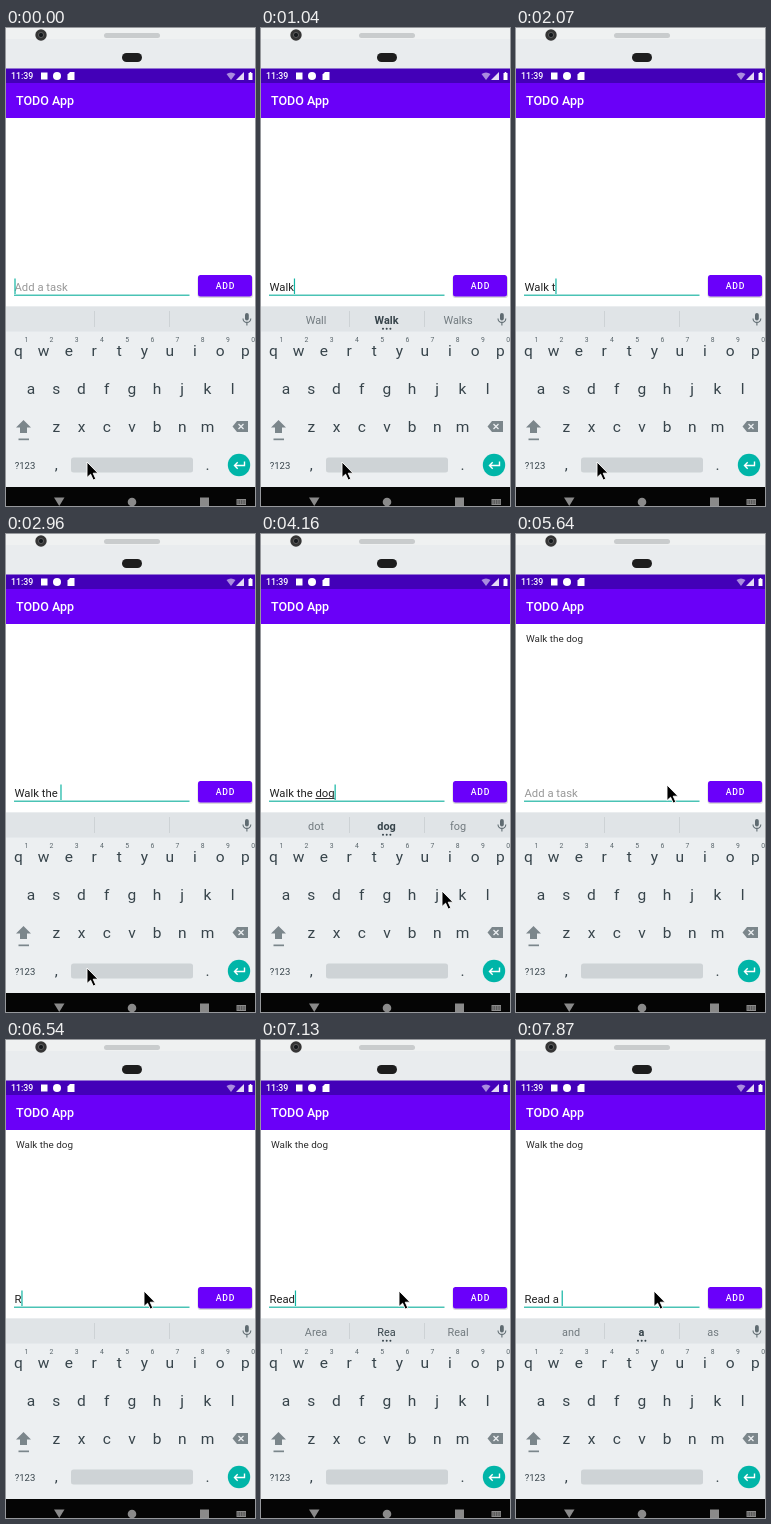
These frames come from a looping animation (249x478 px, 8 s). An HTML page:

```html
<!DOCTYPE html>
<html lang="en">
<head>
<meta charset="utf-8">
<title>TODO App</title>
<style>
  html, body { margin: 0; height: 100%; overflow: hidden; background: #fff; }
  svg { display: block; width: 249px; height: 478px; }
  text { font-family: Roboto, sans-serif; white-space: pre; }
  .mid { text-anchor: middle; }
  .medium { font-weight: 500; }
  .entry { font-size: 11.3px; }
  .word { font-size: 10.9px; fill: #717a7f; }
  #keys { fill: #37444b; font-size: 15.5px; }
  #keys .digit { font-size: 6.8px; fill: #59656b; }
</style>
</head>
<body>
<svg viewBox="0 0 249 478">
  <!-- device -->
  <rect width="249" height="41" fill="#e9ecee"/>
  <rect width="249" height="11" fill="#eff1f1"/>
  <circle cx="35" cy="7" r="5.7" fill="#353535"/>
  <circle cx="35" cy="7" r="2.6" fill="#15191c" stroke="#666" stroke-width=".8"/>
  <rect x="98" y="5" width="56" height="5" rx="2.5" fill="#c9cccd"/>
  <rect x="116" y="25" width="20" height="9" rx="4.5" fill="#1d1d1d"/>

  <!-- status and title bars -->
  <rect y="40.5" width="249" height="15" fill="#4300b8"/>
  <g fill="#fff">
    <text x="5" y="51.3" font-size="8.8" class="medium">11:39</text>
    <rect x="35" y="44.5" width="6.5" height="7"/>
    <circle cx="51" cy="48" r="4"/>
    <path d="M64 44h4.500v8h-7v-5.500z"/>
    <path d="M220.500 46q4.500-3 9 0l-4.500 6z" opacity=".55"/>
    <path d="M238 44v8h-8z" opacity=".85"/>
    <path d="M242.500 45h1.200v-1h1.600v1h1.200v7h-4z"/>
  </g>
  <rect y="55" width="249" height="35" fill="#6a00f8"/>
  <text x="10" y="77" font-size="12.5" class="medium" fill="#fff">TODO App</text>

  <!-- content -->
  <text id="item" x="10" y="108" font-size="9.9" fill="#2c2c2c">Walk the dog</text>
  <text id="hint" x="8.5" y="262.5" class="entry" fill="#989898">Add a task</text>
  <text id="entry" x="8.5" y="262.5" class="entry" fill="#222" xml:space="preserve"></text>
  <rect id="composing" y="264" height="1" fill="#333"/>
  <rect x="8" y="266.600" width="175.500" height="1.2" fill="#1fb5a3"/>
  <rect id="caret" y="250.500" width="1.2" height="15.500" fill="#12b5a3"/>
  <rect id="shadow" x="191.500" y="248" width="55.500" height="22" rx="3" fill="#000" opacity=".15"/>
  <rect id="button" x="192" y="247" width="54" height="21.500" rx="2.5"/>
  <text x="219.400" y="261" class="mid medium" font-size="8.7" letter-spacing=".8" fill="#fff">ADD</text>

  <!-- keyboard -->
  <rect y="278.500" width="249" height="181" fill="#eceff1"/>
  <rect y="278.500" width="249" height="25" fill="#e0e4e7"/>
  <path d="M88.500 283v16M163.500 283v16" stroke="#cdd2d5"/>
  <g id="words">
    <text class="word mid" x="55" y="295.500"></text>
    <text class="word mid" x="125.500" y="295.500" style="fill:#37444b"></text>
    <text class="word mid" x="197" y="295.500"></text>
    <path d="M122 300.800h0m3.700 0h0m3.700 0h0" stroke="#37444b" stroke-width="2" stroke-linecap="round"/>
  </g>
  <g fill="#5f6b71">
    <rect x="239" y="285" width="3.8" height="7.500" rx="1.9"/>
    <path d="M237 290.500a3.900 3.900 0 0 0 7.800 0M240.900 294.500v3" fill="none" stroke="#5f6b71" stroke-width="1.1"/>
  </g>
  <g id="keys"></g>
  <g fill="#7b868b">
    <path d="M17.500 392l7.500 7.500h-4v5.500h-7v-5.500h-4z"/>
    <rect x="12.500" y="410.500" width="10.500" height="1.700"/>
    <path d="M231 393h11v11h-11l-4.500-5.500z"/>
    <path d="M232.500 396l5 5m0-5l-5 5" stroke="#eceff1" stroke-width="1.3"/>
  </g>
  <rect x="65" y="429.500" width="122" height="15" rx="2.5" fill="#ced3d6"/>
  <circle cx="233" cy="437" r="11.2" fill="#00b5a8"/>
  <path d="M238.500 433.500v4h-10m3.200-3.200l-3.200 3.200 3.200 3.200" fill="none" stroke="#fff" stroke-width="1.4"/>

  <!-- navigation bar -->
  <rect y="459" width="249" height="19" fill="#050505"/>
  <g fill="#8a8a8a">
    <path d="M48 469.500h10.500l-5.250 8.500z"/>
    <circle cx="126" cy="474" r="4.3"/>
    <rect x="194" y="469.500" width="9" height="9"/>
    <rect x="230.500" y="471" width="9.500" height="6"/>
    <path d="M231.500 473h8m-8 2h8" stroke="#050505" stroke-width=".8" stroke-dasharray="1 .7"/>
  </g>

  <path id="pointer" d="M0 0V15.500L3.600 12.200 6.200 18 8.800 16.900 6.200 11.200H11Z" stroke="#fff" stroke-width=".9"/>
</svg>
<script>
const LOOP = 8000;
const $ = id => document.getElementById(id);

function addKey(label, x, y, attrs = {}) {
  const key = document.createElementNS("http://www.w3.org/2000/svg", "text");
  for (const [name, value] of Object.entries({ x, y, class: "mid", ...attrs })) key.setAttribute(name, value);
  key.textContent = label;
  $("keys").append(key);
}

function addRow(letters, x, y, attrs) {
  [...letters].forEach((letter, i) => addKey(letter, x + i * 25.2, y, attrs));
}

addRow("qwertyuiop", 12.5, 327.5);
addRow("1234567890", 20.3, 313.5, { class: "mid digit" });
addRow("asdfghjkl", 25, 365.5);
addRow("zxcvbnm", 50.3, 404);
addKey("?123", 19, 440.5, { "font-size": 9.5 });
addKey(",", 50.3, 442);
addKey(".", 201.5, 442);

// Each step overrides part of the state; "*" marks a bold suggestion.
const steps = [
  [0, { text: "", words: "", composing: "", caret: true, item: false, press: 0, pointer: [81, 434] }],
  [150, { text: "W" }],
  [290, { words: "We|W|Was" }],
  [740, { text: "Wa" }],
  [890, { text: "Wal", words: "Way|Wal|Wall" }],
  [1040, { text: "Walk", words: "Wall|*Walk|Walks" }],
  [1190, { words: "" }],
  [1630, { text: "Walk " }],
  [1780, { caret: false }],
  [2070, { text: "Walk t", caret: true }],
  [2220, { words: "to|t|the" }],
  [2360, { text: "Walk th", words: "the|th|things" }],
  [2510, { text: "Walk the", words: "The|*the|thy" }],
  [2660, { text: "Walk the " }],
  [2960, { words: "" }],
  [3260, { text: "Walk the d" }],
  [3410, { text: "Walk the do", words: "to|do|don" }],
  [3560, { text: "Walk the dog" }],
  [3710, { words: "dot|*dog|fog", composing: "dog" }],
  [4160, { pointer: [181, 357] }],
  [4310, { pointer: [204, 296] }],
  [4460, { pointer: [218, 262] }],
  [4600, { press: 1 }],
  [4750, { text: "", composing: "", item: true }],
  [4900, { words: "", press: .5 }],
  [5050, { press: .2 }],
  [5190, { press: 0 }],
  [5490, { caret: false, pointer: [188, 258] }],
  [5640, { pointer: [151, 251] }],
  [5790, { caret: true, pointer: [142, 251] }],
  [5940, { pointer: [138, 251] }],
  [6540, { text: "R" }],
  [6690, { words: "Are|R|Re" }],
  [6840, { text: "Re", words: "Are|Re|Red" }],
  [6980, { text: "Rea" }],
  [7130, { text: "Read", words: "Area|Rea|Real" }],
  [7280, { words: "Red|*Read|Reads" }],
  [7430, { text: "Read " }],
  [7570, { words: "" }],
  [7720, { text: "Read a" }],
  [7870, { text: "Read a ", words: "and|*a|as" }],
];

const show = (id, on) => $(id).style.display = on ? "" : "none";

function render(t) {
  const state = Object.assign({}, ...steps.filter(([at]) => at <= t).map(([, change]) => change));
  const entry = $("entry");
  const widthOf = text => {
    entry.textContent = text;
    return text ? entry.getComputedTextLength() : 0;
  };
  const start = widthOf(state.text.slice(0, state.text.length - state.composing.length));
  const end = widthOf(state.text);

  show("hint", !state.text);
  show("item", state.item);
  show("caret", state.caret);
  $("caret").setAttribute("x", 8.4 + end);
  show("composing", state.composing);
  $("composing").setAttribute("x", 8.5 + start);
  $("composing").setAttribute("width", end - start);

  show("words", state.words);
  const words = state.words.split("|");
  document.querySelectorAll("#words text").forEach((label, i) => {
    const word = words[i] || "";
    label.textContent = word.replace("*", "");
    label.style.fontWeight = word[0] === "*" ? 700 : 400;
  });

  $("button").setAttribute("fill", `rgb(${106 + 38 * state.press}, ${62 * state.press}, 250)`);
  $("shadow").setAttribute("opacity", .15 + .2 * state.press);
  $("pointer").setAttribute("transform", `translate(${state.pointer})`);
}

const origin = performance.now();
function tick() {
  render((performance.now() - origin) % LOOP);
  requestAnimationFrame(tick);
}
tick();
</script>
</body>
</html>
```
